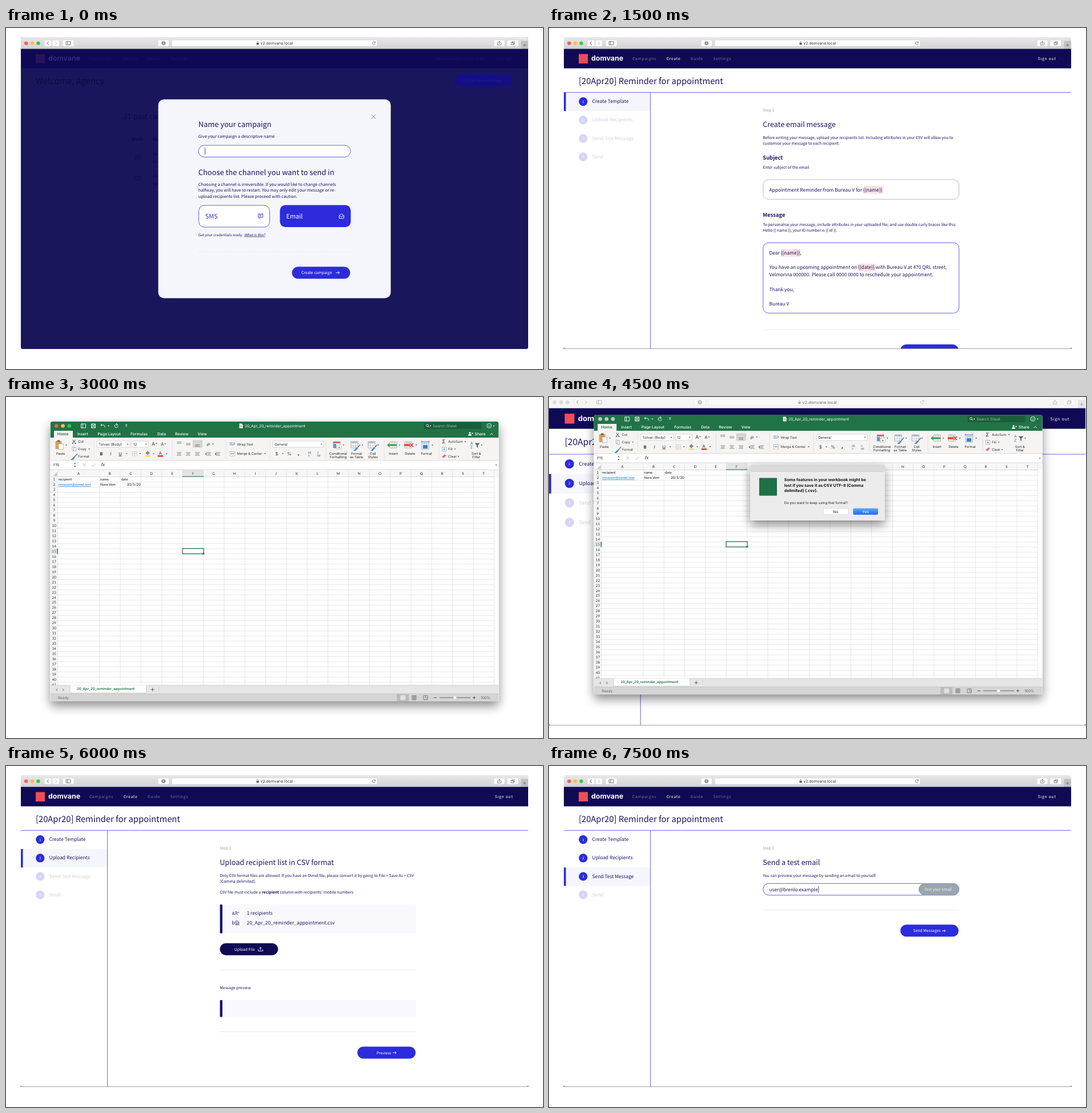
These frames come from a looping animation (940x596 px, 8 s). An HTML page:

```html
<!DOCTYPE html>
<html lang="en">
<head>
<meta charset="utf-8">
<title>Campaign walkthrough</title>
<style>
html,body{margin:0;width:100%;height:100%;overflow:hidden;background:#fff}
svg{display:block;width:100vw;height:100vh}
text{text-rendering:geometricPrecision;white-space:pre}
.web{font-family:'Noto Sans CJK JP','Noto Sans CJK SC','Noto Sans CJK',sans-serif}
.ui{font-family:Inter,Roboto,sans-serif}
.cell{font-family:Lato,'Open Sans',sans-serif}
</style>
</head>
<body>
<svg id="stage" viewBox="0 0 940 596" xmlns="http://www.w3.org/2000/svg"></svg>
<script>
const NAVY = '#100a55', BLUE = '#2c2cdc', INK = '#1a1560', PALE = '#f5f6fc', GREEN = '#217346', GREY = '#666';
const BRAND = 'domvane';

// ---- drawing helpers ----
const rect = (x, y, w, h, fill, rx = 0, more = '') =>
  `<rect x="${x}" y="${y}" width="${w}" height="${h}" fill="${fill}" rx="${rx}" ${more}/>`;
const box = (x, y, w, h, fill, stroke, rx = 0, sw = 1) =>
  rect(x, y, w, h, fill, rx, `stroke="${stroke}" stroke-width="${sw}"`);
const line = (d, stroke, w = 1, more = '') =>
  `<path d="${d}" fill="none" stroke="${stroke}" stroke-width="${w}" ${more}/>`;
const shape = (d, fill) => `<path d="${d}" fill="${fill}"/>`;
const dot = (x, y, r, fill, more = '') => `<circle cx="${x}" cy="${y}" r="${r}" fill="${fill}" ${more}/>`;
// y is the middle of the capitals
const text = (cls, x, y, s, size, fill, more = '') =>
  `<text class="${cls}" x="${x}" y="${(y + size * .34).toFixed(2)}" font-size="${size}" fill="${fill}" ${more}>${s}</text>`;
const web = (x, y, s, size = 7.67, fill = INK, more = '') =>
  text('web', x, y, s, +(size / 1.12).toFixed(2), fill, more);
const ui = (x, y, s, size = 5.9, fill = '#333', more = '') => text('ui', x, y, s, size, fill, more);
const cell = (x, y, s, fill = '#111', more = '') => text('cell', x, y, s, 6.2, fill, more);
const MID = 'text-anchor="middle"', BOLD = 'font-weight="700"', SEMI = 'font-weight="500"';
const caret = (x, y, c = '#555') => shape(`M${x - 1.4} ${y - .8}h2.8l-1.4 2z`, c);
const arrow = (x, y, w = 6) => line(`M${x} ${y}h${w}m-2.2 -2.2l2.2 2.2l-2.2 2.2`, '#fff', .9);
const pill = (x, y, w, fill, h = 21) => rect(x, y, w, h, fill, h / 2);
const envelope = (x, y, c) => line(`M${x - 4} ${y - 1}l4 -3l4 3v5h-8zl4 2.5l4 -2.5`, c, .9);
const bubble = (x, y, c) => line(`M${x - 4} ${y - 3.5}h8v6h-4.5l-2 2v-2h-1.5zM${x - 2} ${y - 1.5}h4m-4 2h3`, c, .9);

// ---- browser ----
function chrome(on) {
  const ic = on ? '#555' : '#aaa', fill = on ? '#fdfdfd' : '#f9f9f9';
  const btn = (x, w) => box(x, 21, w, 11, fill, on ? '#d0d0d0' : '#e6e6e6', 2, .6);
  const lights = on ? ['#fc5b57', '#fdbc40', '#34c84a'] : ['#dcdcdc', '#dcdcdc', '#dcdcdc'];
  return rect(26, 16, 888, 21, on ? 'url(#bar)' : '#f6f6f6') +
    lights.map((c, i) => dot(35.3 + i * 10.6, 26.6, 3.2, c)).join('') +
    btn(67, 13) + btn(81, 12.5) + btn(99, 20) + btn(266, 19.5) + btn(290, 360) + btn(854, 19) + btn(877, 20) +
    line('M74.6 23.7l-2.5 2.9l2.5 2.9', ic, 1) + line('M86 23.7l2.5 2.9l-2.5 2.9', '#aaa', .8) +
    line('M105 23.8h8v5.6h-8zM107.7 23.8v5.6', ic, .8) +
    dot(275.7, 26.6, 3.4, on ? '#888' : '#bbb') + line('M275.7 24.6v4', '#fff', 1) +
    rect(438.6, 26, 4, 3.2, ic, .5) + line('M439.4 26v-1a1.2 1.2 0 0 1 2.4 0v1', ic, .6) +
    ui(445.5, 26.8, `v2.${BRAND}.local`, 6.8, on ? '#333' : '#666') +
    line('M646.2 25.2a2.6 2.6 0 1 0 .2 2.2M646.6 23.6v1.9h-1.9', ic, .7) +
    line('M862 25.6h-1.4v4.2h6v-4.2h-1.4M863.6 28v-5m-1.5 1.4l1.5 -1.4l1.5 1.4', ic, .7) +
    line('M884 25.5h4.6v3.8h-4.6zM885.6 25.5v-1.6h4.6v3.8h-1.6', ic, .7) +
    rect(901.5, 22.5, 12.5, 14.5, on ? '#c2c1c2' : '#e6e6e6') +
    line('M905 30h5.6M907.8 27.2v5.6', on ? '#666' : '#999', .7);
}

function nav(dim) {
  const faint = dim ? '#1d1866' : '#77749d', strong = dim ? '#1d1866' : '#fff';
  const item = (x, s, c, more = '') => web(x, 54, s, 7.67, c, `letter-spacing=".7" ${more}`);
  return rect(26, 36.5, 888, 34, dim ? '#0f0955' : NAVY) +
    rect(52, 45.5, 16, 16.5, dim ? '#2a1259' : '#ee4d55') +
    ui(74, 53, BRAND, 12.4, dim ? '#302b76' : '#fff', BOLD) +
    item(146, 'Campaigns', faint) + item(205.7, 'Create', strong, SEMI) + item(248, 'Guide', faint) +
    item(287.6, 'Settings', faint) + item(855.7, 'Sign out', strong) +
    (dim ? item(752, 'domvane@brenlo.test', faint) : '');
}

function page(step, body, on = true) {
  const names = ['Create Template', 'Upload Recipients', 'Send Test Message', 'Send'];
  const top = 113 + 32.2 * (step - 1);
  return `<g clip-path="url(#win)">` + rect(26, 16, 888, 545, '#fff') + chrome(on) + nav(false) +
    web(52, 92.5, '[20Apr20] Reminder for appointment', 16.5, INK, 'font-weight="300"') +
    rect(26, top, 151, 32.2, PALE) + rect(26, top, 3.6, 32.2, BLUE) +
    names.map((s, i) => {
      const y = 128.6 + 32.2 * i, done = i < step;
      return dot(59.8, y, 7.6, done ? BLUE : '#d5d5f8') + web(59.8, y + .2, i + 1, 6.6, '#fff', MID) +
        web(75.6, y - .3, s, 9.4, done ? INK : '#d2d2de');
    }).join('') +
    line('M26 112.5H914M177.5 112.5V561', '#6b6be0', 1) + body + '</g>' +
    line('M27 560.5H913', '#999', .9) +
    shape('M25.5 559h1l1 1.5h-2zM914.5 559h-1l-1 1.5h2z', '#222');
}
const title = (n, s) => web(374.3, 143.5, 'Step ' + n, 7.67, '#a3a3b0') + web(374.3, 169, s, 14.1);
const rule = y => line(`M374.5 ${y}H717.5`, '#e4e4ec', .8);
const quote = (y, h) => rect(374.5, y, 343, h, '#f9f9fd') + rect(374.5, y, 4.3, h, '#14106b', 1.5);

// ---- scenes ----
function nameCampaign() {
  const d = '#0e0949', bg = '#1a165b';
  return `<g clip-path="url(#win)">` + rect(26, 16, 888, 545, bg) + chrome(true) + nav(true) +
    web(52, 92.5, 'Welcome, Agency', 16.5, d, 'font-weight="300"') +
    pill(785, 81, 101.5, '#140e85') + web(801, 91.7, 'Create new campaign', 7.67, '#262080') +
    line('M26 112.5H914', '#18136a', .8) +
    web(205.5, 154.5, '21 past campaigns', 14.3, d) +
    web(220, 194, 'Mode', 8.6, d, BOLD) + web(257, 194, 'Name', 8.6, d, BOLD) +
    envelope(231, 225, '#0e0960') + bubble(231, 262.5, '#0e0960') +
    web(257, 220, 'Ge', 8.6, d) + web(257, 233, 'an', 8.6, d) + web(257, 258, 'Ge', 8.6, d) + web(257, 271, 'ap', 8.6, d) +
    '</g>' +
    rect(266.5, 124.7, 407, 347.5, PALE, 10) +
    line('M639.7 151.3l7.2 7.2m0 -7.2l-7.2 7.2', '#777', 1) +
    web(336.8, 169, 'Name your campaign', 14.4, INK, SEMI) +
    web(336.8, 189, 'Give your campaign a descriptive name', 8.22) +
    box(337, 205, 266, 20.5, '#fff', '#6363e3', 10.2) + line('M348.3 209v12', '#222', .8) +
    web(336.8, 253, 'Choose the channel you want to send in', 14.4, INK, SEMI) +
    ['Choosing a channel is irreversible. If you would like to change channels',
     'halfway, you will have to restart. You may only edit your message or re-',
     'upload recipients list. Please proceed with caution.'
    ].map((s, i) => web(336.8, 273 + 10.7 * i, s, 8.22)).join('') +
    box(337.5, 310, 124, 38, '#fff', '#6363e3', 9.5) + rect(479.5, 309.5, 124, 38.5, BLUE, 9.5) +
    web(348.8, 329, 'SMS', 12.1, BLUE) + web(490.5, 329, 'Email', 12.3, '#fff') +
    bubble(445.5, 328.5, BLUE) + envelope(587.3, 328.7, '#fff') +
    web(336.8, 361.5, 'Get your credentials ready.', 7) +
    web(417.3, 361.5, 'What is this?', 7.05, INK, 'font-style="italic" font-weight="500" text-decoration="underline"') +
    line('M337 391H603', '#e0e0ec', .8, 'stroke-dasharray="2 1"') +
    pill(500.5, 417.3, 102, BLUE) + web(517, 428, 'Create campaign', 7.67, '#fff') + arrow(577.5, 427.7);
}

function writeMessage() {
  const mark = (x, y, w) => rect(x, y, w, 13.5, '#fde0e4');
  return page(1, title(1, 'Create email message') +
    web(374.3, 191.7, 'Before writing your message, upload your recipients list. Including attributes in your CSV will allow you to') +
    web(374.3, 201.8, 'customise your message to each recipient.') +
    web(374.3, 227, 'Subject', 10.5, INK, BOLD) + web(374.3, 243.3, 'Enter subject of the email') +
    box(374.7, 265, 343, 34.3, '#fff', '#b9b9c6', 9.5) + mark(551, 276, 34.5) +
    web(385.5, 283, 'Appointment Reminder from Bureau V for {{name}}', 9.42) +
    web(374.3, 327, 'Message', 10.5, INK, BOLD) +
    web(374.3, 343.3, 'To personalise your message, include attributes in your uploaded file, and use double curly braces like this:') +
    web(374.3, 353.4, 'Hello {{ name }}, your ID number is {{ id }}.') +
    box(374.7, 375.3, 343, 123, '#fff', '#6363e3', 9.5) + mark(406, 386.3, 34.5) + mark(542, 411.8, 29.8) +
    ['Dear {{name}},', '', 'You have an upcoming appointment on {{date}} with Bureau V at 470 QRL street,',
     'Velmorina 000000. Please call 0000 0000 to reschedule your appointment.', '', 'Thank you,', '', 'Bureau V'
    ].map((s, i) => s && web(385.5, 393.2 + 12.7 * i, s, 9.42)).join('') +
    rule(527) + pill(615, 553, 102, BLUE));
}

const uploadList = () => page(2, title(2, 'Upload recipient list in CSV format') +
  web(374.3, 191.7, 'Only CSV format files are allowed. If you have an Ovnel file, please convert it by going to File &gt; Save As &gt; CSV') +
  web(374.3, 201.8, '(Comma delimited).') +
  web(374.3, 220.4, `CSV file must include a <tspan ${BOLD}>recipient</tspan> column with recipients' mobile numbers`) +
  quote(242, 50.5) +
  web(395.3, 257.5, 'a', 9.4) + web(395.3, 274.5, 'b', 9.4) +
  dot(403, 255.6, 1.3, 'none', `stroke="${INK}" stroke-width=".8"`) +
  line('M400.6 260v-.8q2.4 -2.4 4.6 0v.8M405 256l1 1l2 -2.2', INK, .8) +
  line('M402 271h3.6l2 2v4.6h-5.6zM403.4 274h2.8m-2.8 1.7h2.8', INK, .8) +
  web(421.5, 257.5, '1 recipients', 9.4) + web(421.5, 274.5, '20_Apr_20_reminder_appointment.csv', 9.45) +
  pill(374.3, 309.7, 102, NAVY) + web(399.8, 320.6, 'Upload File', 7.6, '#fff') +
  line('M441.5 320.5v2.8h8v-2.8M445.5 321.5v-4.6m-1.8 1.7l1.8 -1.8l1.8 1.8', '#fff', .9) +
  rule(356.5) + web(374.3, 387.8, 'Message preview') + quote(409, 29.7) + rule(464.5) +
  pill(615, 490.5, 102, BLUE) + web(648.8, 501.3, 'Preview', 7.6, '#fff') + arrow(677, 501));

const sendTest = () => page(3, title(3, 'Send a test email') +
  web(374.3, 191.7, 'You can preview your message by sending an email to yourself.') +
  box(374.7, 205.3, 343, 20.5, '#fff', '#6363e3', 10.2) +
  web(385.5, 216, 'user@brenlo.example', 9.3) + line('M471.8 209.5v12', '#222', .8) +
  box(647.3, 205.5, 70.3, 20, '#9ba5af', '#8f98b4', 10, .7) + web(657, 215.7, 'Test your email', 7.63, '#f3f5f7') +
  rule(251.5) + pill(615, 277.3, 102, BLUE) + web(637.6, 288, 'Send Messages', 7.6, '#fff') + arrow(688, 288));

// ---- spreadsheet ----
function ribbon() {
  const W = '#fff', drop = (...xy) => xy.map(([x, y]) => caret(x, y)).join('');
  const mid = (x, y, s, size = 5.8) => ui(x, y, s, size, '#222', MID);
  const bars = (x, y, ws, c = '#666') => ws.map((w, i) => line(`M${x - w / 2} ${y + (i - 1) * 2.4}h${w}`, c, .8)).join('');
  const combo = (x, w, s) => box(x, 77, w, 11, W, '#c9c9c9', 0, .7) + ui(x + 3, 82.6, s, 6.2, '#222') + caret(x + w - 4, 82.5);
  const table = (x, y, c) => box(x - 6, y - 6, 12, 11, W, '#8a8a8a', 0, .7) + rect(x - 6, y - 6, 12, 3, c) +
    line(`M${x - 2} ${y - 6}v11M${x + 2} ${y - 6}v11M${x - 6} ${y + 1}h12`, '#999', .5);
  const brush = (x, y) => line(`M${x + 7} ${y - 4}l-6 7`, '#777', 1.4) + shape(`M${x + 1} ${y + 1}l2 2l-4 4l-4 0z`, '#3c8fd6');
  return rect(77.5, 71, 785, 40, '#f5f4f3') + line('M77.5 110.7H862.5', '#d0d0d0', .8) +
    [154, 291, 385, 462, 560, 662, 758].map(x => line(`M${x} 75v32`, '#dcdcdc', .7)).join('') +
    rect(86.5, 77, 11, 14, '#dfa04a', 1) + rect(89.5, 75.5, 5, 3, '#666', 1) + box(92, 82, 8, 10, W, '#999', 0, .6) + mid(95.5, 99, 'Paste') +
    line('M116.5 74.5l5 6.5m0 -6.5l-5 6.5', '#333', .9) + dot(116.7, 81.2, 1.1, '#2f74b5') + dot(121.5, 81.2, 1.1, '#2f74b5') +
    box(116, 87, 4, 6, W, '#888', 0, .6) + box(118.5, 88.7, 4, 6, W, '#888', 0, .6) + brush(118, 103) +
    ui(126.3, 78, 'Cut') + ui(126.3, 91, 'Copy') + ui(126.3, 104, 'Format') +
    combo(159, 58, 'Tolvari (Body)') + combo(220, 29, '12') +
    ui(255, 82.5, 'A', 8.5) + ui(271, 82.8, 'A', 7.5) + line('M262 82l1.3 -1.6l1.3 1.6', '#333', .7) + line('M277.5 81l1.3 1.6l1.3 -1.6', '#333', .7) +
    ui(167, 99.2, 'B', 7.4, '#222', MID + ' ' + BOLD) + ui(183.3, 99.2, 'I', 7.4, '#222', MID + ' font-style="italic"') +
    ui(200, 99.2, 'U', 7.4, '#222', MID + ' text-decoration="underline"') +
    line('M221 95.5h8v7.5h-8zM225 95.5v7.5M221 99.2h8', '#999', .6, 'stroke-dasharray="1 .7"') +
    shape('M244 98l4 -4l4 4l-4 3.5z', '#888') + rect(243, 102, 10, 2.4, '#ffe92e') +
    ui(270, 98, 'A', 7.5, '#333', MID) + rect(265.5, 102, 9.5, 2.4, '#e32b1d') +
    box(327.3, 76, 16, 12, '#d8d7d6', '#bbb', 1, .6) +
    bars(303, 81, [8, 8]) + bars(319, 83.5, [8, 8]) + bars(335, 86, [8, 8]) +
    bars(303, 99.5, [8, 6, 8]) + bars(319, 99.5, [8, 5, 8]) + bars(335, 99.5, [8, 6, 8]) +
    ui(350, 82.5, 'ab', 6, '#333', 'transform="rotate(-30 354 82)"') +
    bars(355, 99.5, [8, 5, 8]) + bars(371, 99.5, [8, 5, 8]) + shape('M348 99.5l3 -2v4z M369 99.5l-3 -2v4z', '#2f74b5') +
    line('M391.5 80.5h5m-5 3h6q3 0 3 -1.7t-3 -1.6', '#2f74b5', .9) + ui(404.5, 82.7, 'Wrap Text') +
    box(392, 95.5, 8.5, 7.5, W, '#999', 0, .6) + line('M393.5 99.2h5.5', '#2f74b5', 1) + ui(404.5, 99.2, 'Merge &amp; Center') +
    combo(467, 89, 'General') + ui(471.5, 99.2, '$', 7.6) + ui(492, 99.2, '%', 7.6) + ui(510.5, 98, ',', 10, '#222', BOLD) +
    ui(527.5, 97.5, '.00', 4.6) + ui(527.5, 102, '.0', 4.6, '#2f74b5') + ui(543.5, 97.5, '.0', 4.6, '#2f74b5') + ui(543.5, 102, '.00', 4.6) +
    table(579, 84, '#df675d') + rect(573, 82, 5, 7, '#5c95cf') + box(579, 84, 8, 7, W, '#999', 0, .5) + ui(583, 87.5, '≠', 6, '#333', MID) +
    table(610, 84, '#a9c4dc') + brush(613, 87) + table(640, 84, '#a9c4dc') + brush(643, 87) +
    mid(581.5, 99, 'Conditional') + mid(581.5, 105.3, 'Formatting') + mid(613.5, 99, 'Format') + mid(613.5, 105.3, 'as Table') +
    mid(642.3, 99, 'Cell') + mid(642.3, 105.3, 'Styles') +
    table(678, 84, '#ddd') + shape('M667 84l4 -3.5v2h13v3h-13v2z', '#3c9a52') + mid(678, 99, 'Insert') +
    table(704, 84, '#ddd') + rect(697, 82, 10, 4, '#d6534b') + line('M707 81l6 6m0 -6l-6 6', '#d6302b', 1.3) + mid(707, 99, 'Delete') +
    table(734, 86, '#ddd') + rect(730, 84, 8, 6, '#2f83cf') + line('M727.5 76v4M740.5 76v4M727.5 78h13', '#2f83cf', .9) + mid(736, 99, 'Format') +
    ui(763.3, 78, 'Σ', 9) + box(763.5, 87.3, 7, 7, W, '#888', 0, .6) + line('M767 88.5v4m-1.7 -1.7l1.7 1.7l1.7 -1.7', '#2f74b5', .9) +
    shape('M763 104.5l5 -4.5l3 2.3l-5 4.5z', '#e0728a') +
    ui(774, 78, 'AutoSum') + ui(774, 91, 'Fill') + ui(774, 104, 'Clear') +
    ui(813, 80.5, 'A', 6.5, '#2f74b5') + ui(813, 87.5, 'Z', 6.5, '#7b4a9e') + shape('M820.5 80.5h9l-3.5 4v4.5l-2 -1.5v-3z', '#666') +
    mid(823.2, 99, 'Sort &amp;') + mid(823.2, 105.3, 'Filter') +
    drop([105.5, 84], [145.5, 91], [211, 99], [235, 99], [258.5, 99], [281, 99], [362.5, 82], [453.5, 99], [484.5, 99],
      [591, 84], [624, 84], [652, 84], [689, 84], [718, 84], [746.5, 84], [804, 78], [786, 91], [792, 104], [832.5, 84]);
}

function sheet(on) {
  const rowY = n => 144.1 + 8.97 * (n - 1), colX = i => i ? 163.7 + 36.35 * (i - 1) : 90.7;
  const lights = on ? ['#fc5b57', '#fdbc40', '#34c84a'] : Array(3).fill('#bccfc3');
  const file = '20_Apr_20_reminder_appointment';
  let rows = '', cols = '', grid = '';
  for (let n = 1; n <= 41; n++) {
    rows += cell(84.2, rowY(n), n, n === 15 ? GREEN : '#222', MID);
    grid += `M77.5 ${(rowY(n) + 4.5).toFixed(2)}H855`;
  }
  for (let i = 0; i < 20; i++) {
    cols += cell((colX(i) + colX(i + 1)) / 2, 133.7, String.fromCharCode(65 + i), i === 5 ? GREEN : '#222', MID);
    grid += `M${colX(i).toFixed(2)} 128V504`;
  }
  grid += 'M854.4 128V504';
  const tabs = [[125, 'Insert'], [160.5, 'Page Layout'], [218, 'Formulas'], [265, 'Data'], [296, 'Review'], [335.5, 'View']];
  return `<g filter="url(#shadow)">` + rect(77.5, 43, 785, 489, '#fff', 4) + '</g><g clip-path="url(#book)">' +
    rect(77.5, 43, 785, 28, GREEN) + lights.map((c, i) => dot(88.3 + i * 11.2, 50.5, 3.3, c)).join('') +
    line('M131.5 47h8v7h-8zM134.3 47v7M149.5 47h7v7h-7zM151 47v2.5h4V47M151 54v-2.5h4V54', '#fff', .9) +
    line('M166 49h5q2.5 .5 2 4M168 47l-2 2l2 2M195.5 48.7a3 3 0 1 0 .6 2M193 46.3l2.5 2.2l-2.4 1.8M208.8 48.4h3.4', '#fff', .9) +
    caret(179.5, 50.5, '#fff') + caret(210.5, 51, '#fff') +
    shape('M408.5 46.5h4l2 2v6h-6z', '#fff') + line('M409.8 50h3.4m-3.4 2h3.4', GREEN, .7) +
    ui(418, 51, file, 6.6, '#fff') +
    rect(731.5, 45, 101, 11, '#1b5d39', 1) + dot(737.5, 49.7, 2, 'none', 'stroke="#fff" stroke-width=".8"') +
    line('M739 51.2l2 2', '#fff', .8) + caret(743, 50.5, '#fff') + ui(747, 50.8, 'Search Sheet', 6.6, '#9dc0ac') +
    dot(845.8, 50.3, 4, 'none', 'stroke="#fff" stroke-width=".8"') + dot(844.4, 49.3, .6, '#fff') + dot(847.2, 49.3, .6, '#fff') +
    line('M843.8 51.3q2 2 4 0', '#fff', .7) + caret(854, 50.5, '#fff') +
    rect(84, 59, 33, 12.5, '#f5f4f3') + ui(90, 65, 'Home', 6.9, GREEN, 'font-weight="600"') +
    tabs.map(([x, s]) => ui(x, 65, s, 6.8, '#fff', SEMI)).join('') +
    dot(812, 62.5, 1.6, '#fff') + shape('M809 67.5q0 -3 3 -3t3 3z', '#fff') + line('M815 63.6h3m-1.5 -1.5v3', '#fff', .7) +
    ui(820.5, 64.8, 'Share', 6.9, '#fff', SEMI) + line('M847.5 66l2.5 -2.6l2.5 2.6', '#fff', .9) +
    ribbon() +
    ui(83, 119.2, 'F15', 6.4, '#222') + shape('M119 117.3l1.7 -2.6l1.7 2.6zM119 120.2l1.7 2.6l1.7 -2.6z', '#555') +
    line('M126 112v14', '#ddd', .7) + line('M134.3 116l5 5.4m0 -5.4l-5 5.4M150 119l2 2.2l4.5 -5', '#b5b5b5', .9) +
    text('web', 166, 118.5, 'fx', 8, '#333', 'font-style="italic"') + caret(858, 119) +
    rect(77.5, 127, 785, 12.5, '#f7f7f7') + rect(77.5, 139.5, 13.2, 364, '#f7f7f7') +
    rect(308.8, 127, 37, 12, '#e3e3e3') + rect(77.5, 265.2, 13, 9, '#e3e3e3') +
    line(grid, '#dedede', .7) + line('M77.5 127H862.5M77.5 139.5H855', '#c9c9c9', .7) + shape('M89.5 131v7h-7z', '#c8c8c8') +
    line('M308.8 139H346', GREEN, 1.2) + line('M90.2 265V274.2', GREEN, 1.4) + rows + cols +
    cell(91.7, 144.2, 'recipient') + cell(165, 144.2, 'name') + cell(201.5, 144.2, 'date') +
    cell(91.7, 153.2, 'noravem@zumel.test', '#1a6fc4', 'text-decoration="underline"') +
    cell(165, 153.2, 'Nora Vem') + cell(235.5, 153.2, '20/5/20', '#111', 'text-anchor="end"') +
    box(308.9, 264.8, 37, 9.2, '#fff', GREEN, 0, 1.3) + rect(344.3, 272.4, 2.8, 2.8, GREEN) +
    rect(77.5, 503.7, 785, 15, '#e7e6e6') + line('M77.5 503.9H862.5', '#c4c4c4', .7) +
    shape('M90 509l-3.6 2.7l3.6 2.7zM99 509l3.6 2.7l-3.6 2.7z', '#aaa') +
    rect(112, 503.7, 133.5, 13.3, '#fff') + line('M112 504v13H245.5v-13M267.5 506v10', '#c4c4c4', .7) +
    ui(124, 510.4, file, 6.1, GREEN, 'font-weight="600"') + line('M253.5 511.3h6m-3 -3v6', '#555', .9) +
    rect(77.5, 518.7, 785, 13.5, '#d6d5d5') + line('M77.5 518.8H862.5', '#bbb', .7) + ui(91, 525.8, 'Ready', 6.4, GREY) +
    rect(684, 519, 21, 13, '#bdbcbc') +
    line('M691 522h7.5v7h-7.5zM693.5 522v7M696 522v7M691 524.4h7.5M691 526.7h7.5', '#fff', .8) +
    line('M711 522h7v7h-7zM713 522v7M716 522v7M713 524.5h3M713 526.5h3M731 522h7v7h-7zM734.5 522v4h3.5', GREY, .8) +
    line('M748.8 525.5h5M817 525.5h5m-2.5 -2.5v5', '#555', 1) + line('M758.5 525.5H813', '#8a8a8a', 1.3) +
    dot(785.8, 525.5, 2.9, '#fff', 'stroke="#aaa" stroke-width=".4"') + ui(831, 525.8, '100%', 6.5, GREY) + '</g>';
}

function saveWarning() {
  return `<g transform="translate(-27.5 -19) scale(1.0575)">${page(2, '', false)}</g>` +
    `<g transform="translate(1.2 -12)">${sheet(false)}</g>` +
    `<g filter="url(#shadow)">${rect(352.3, 118, 235.4, 97.5, '#ececec', 3)}</g>` +
    rect(352.3, 118, 235.4, 12, '#dadada', 3) + line('M352.3 130.2H587.7', '#c2c2c2', .7) +
    rect(368, 141.5, 31, 31, '#1f7145') +
    ['Some features in your workbook might be', 'lost if you save it as CSV UTF-8 (Comma', 'delimited) (.csv).']
      .map((s, i) => ui(411.8, 145 + 9.4 * i, s, 7.05, '#111', BOLD)).join('') +
    ui(411.8, 184.5, 'Do you want to keep using that format?', 6, '#222') +
    box(480.5, 194.7, 43.5, 10.8, '#fff', '#d2d2d2', 2, .6) + rect(532.3, 194.5, 43.7, 11.2, 'url(#yes)', 2) +
    ui(502, 200.3, 'No', 6.6, '#222', MID) + ui(554, 200.3, 'Yes', 6.6, '#fff', MID);
}

// ---- timeline ----
const STEP = 1500, LOOP = 8000;
const fade = (id, a, b) => `<linearGradient id="${id}" x2="0" y2="1"><stop stop-color="${a}"/><stop offset="1" stop-color="${b}"/></linearGradient>`;
const scenes = [nameCampaign(), writeMessage(), sheet(true), saveWarning(), uploadList(), sendTest()];
const stage = document.getElementById('stage');
stage.innerHTML = '<defs>' + fade('bar', '#e9e7e9', '#d3d1d3') + fade('yes', '#5ba7fb', '#1a6ff5') +
  `<clipPath id="win">${rect(26, 16, 888, 545, '#000', 3)}</clipPath>
   <clipPath id="book">${rect(77.5, 43, 785, 489, '#000', 4)}</clipPath>
   <filter id="shadow" x="-20%" y="-20%" width="140%" height="150%">
     <feDropShadow dx="0" dy="8" stdDeviation="9" flood-color="#000" flood-opacity=".45"/></filter></defs>` +
  scenes.map(s => `<g class="scene">${s}</g>`).join('');
const groups = [...stage.querySelectorAll('.scene')];

function draw(ms) {
  const now = Math.floor((ms % LOOP) / STEP);
  groups.forEach((g, i) => g.style.display = i === now ? '' : 'none');
}
const start = performance.now();
function tick() {
  draw(performance.now() - start);
  requestAnimationFrame(tick);
}
tick();
</script>
</body>
</html>
```
